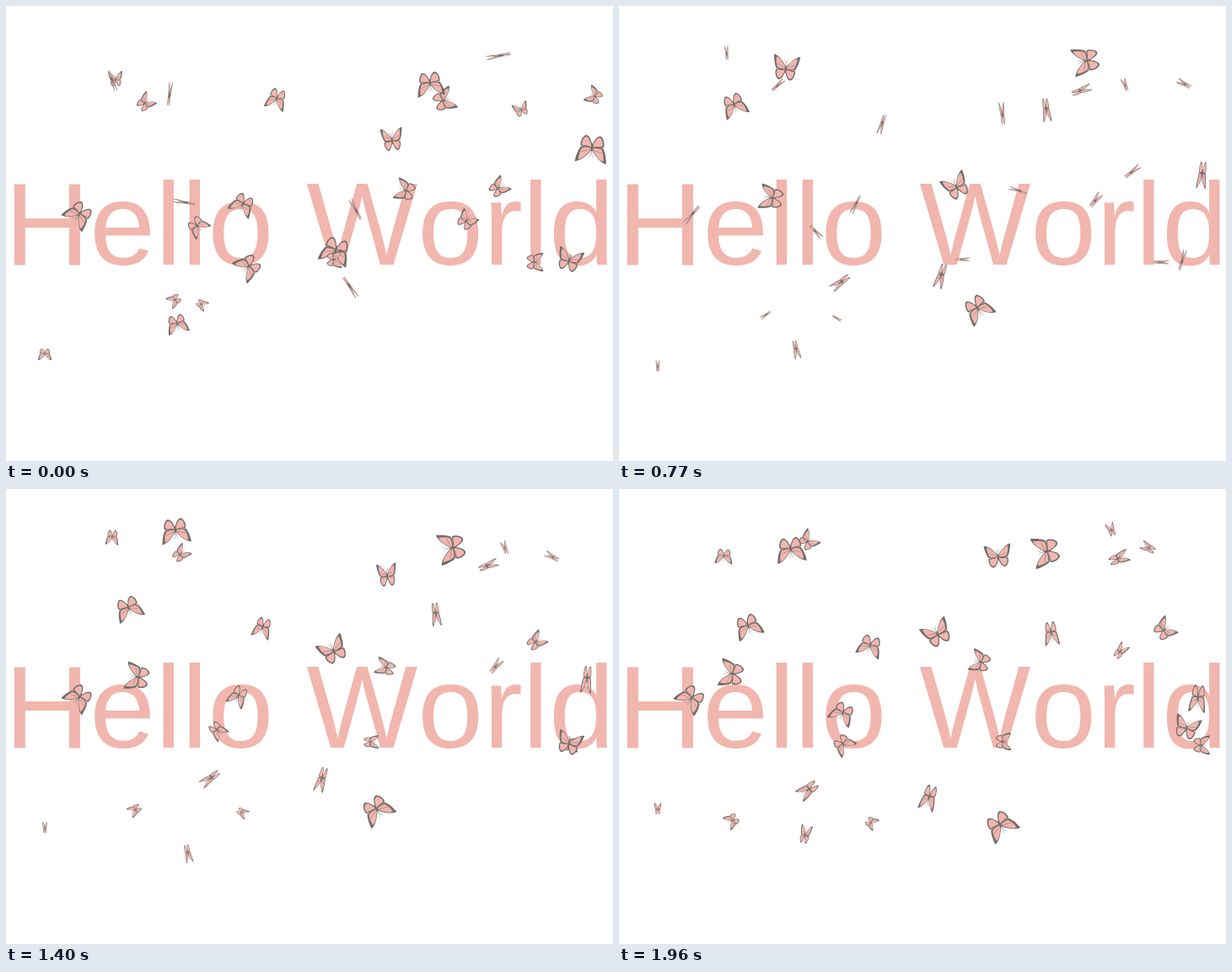
These frames come from a looping animation (720x540 px, 2.03 s). An HTML page with a canvas:

```html
<!DOCTYPE html>
<html lang="en">
<head>
<meta charset="utf-8">
<title>Hello World</title>
<style>
  html, body { margin: 0; width: 100%; height: 100%; overflow: hidden; background: #fff; }
  canvas { display: block; width: 720px; height: 540px; }
</style>
</head>
<body>
<canvas id="stage" width="720" height="540"></canvas>
<script>
const ctx = document.getElementById('stage').getContext('2d');
const STEP = 70, STEPS = 29;   // ms per pose, poses per loop
const SPEED = 2.83;            // px per pose
const TOP = 36, BOTTOM = 442;  // flight limits
const PINK = '#f1b6ad', GREY = '#706b6a';

// Left wings of a butterfly with a span of 1, head up.
const foreEdge = new Path2D('M0 -.04C-.12 -.22 -.34 -.42 -.5 -.43C-.48 -.27 -.44 -.1 -.36 .02C-.24 .06 -.1 .05 0 .02Z');
const foreFill = new Path2D('M-.03 -.04C-.13 -.2 -.28 -.34 -.4 -.36C-.4 -.22 -.37 -.1 -.31 -.01C-.2 .02 -.1 .02 -.03 0Z');
const hindEdge = new Path2D('M0 .01C-.14 .06 -.28 .04 -.36 .05C-.4 .16 -.34 .32 -.24 .38C-.13 .4 -.05 .25 0 .1Z');
const hindFill = new Path2D('M-.03 .04C-.14 .08 -.25 .07 -.32 .08C-.35 .17 -.3 .29 -.23 .33C-.14 .35 -.07 .21 -.03 .09Z');
const vein = new Path2D('M0 -.02L-.34 -.13');
const feelers = new Path2D('M0 -.08Q-.01 -.2 -.06 -.28M0 -.08Q.01 -.2 .06 -.28');

// Starts are x, y, heading in degrees; spans grow evenly along each flock.
const flocks = [
  { beat: 6.75, peak: 8, small: 16, large: 33, starts: [
    [232, 354, 32], [200, 349, 146], [130, 87, -94], [165, 115, -42],
    [584, 216, -38], [321, 110, 107], [458, 159, -96]] },
  { beat: 7.45, peak: 8, small: 17, large: 40, starts: [
    [46, 413, 90], [611, 123, -110], [698, 107, -152], [546, 255, -52], [203, 377, 77],
    [519, 112, -22], [288, 309, 143], [503, 92, 83], [391, 290, 107], [695, 169, 96]] },
  { beat: 7.95, peak: 4.1, small: 33, large: 38, starts: [
    [126, 88, 70], [212, 233, -170], [415, 242, -118],
    [194, 105, -83], [408, 333, 56], [585, 59, 169]] },
  // These rest on the lettering and leave one after another.
  { beat: 6.75, peak: 8, small: 22, large: 34, resting: true, starts: [
    [389, 301, -1], [627, 304, 0], [227, 261, 47], [474, 219, -163],
    [281, 235, 117], [668, 302, -74], [87, 247, 130]] }
];

function wing(side, open) {
  ctx.save();
  ctx.scale(side * open, 1);
  ctx.fillStyle = GREY;
  ctx.fill(hindEdge);
  ctx.fill(foreEdge);
  ctx.fillStyle = PINK;
  ctx.fill(hindFill);
  ctx.fill(foreFill);
  ctx.lineWidth = 0.012;
  ctx.stroke(vein);
  ctx.restore();
}

function butterfly(x, y, angle, span, open) {
  ctx.save();
  ctx.translate(x, y);
  ctx.rotate(angle);
  ctx.scale(span, span);
  ctx.strokeStyle = GREY;
  wing(-1, open);
  wing(1, open);
  ctx.lineWidth = 0.01;
  ctx.stroke(feelers);
  ctx.fillStyle = GREY;
  ctx.beginPath();
  ctx.ellipse(0, 0.03, 0.024, 0.12, 0, 0, 2 * Math.PI);
  ctx.fill();
  ctx.restore();
}

const flap = (n, beat, peak) =>
  0.1 + 0.87 * Math.abs(Math.cos(Math.PI * (n - peak) / beat)) ** 1.3;

function drawFlock({ beat, peak, small, large, resting, starts }, n) {
  starts.forEach(([x, y, degrees], i) => {
    const span = small + (large - small) * i / (starts.length - 1);
    const launch = resting ? 4.5 + i ** 1.75 : 0;
    const open = n < launch ? flap(n, 20, 21.5) : flap(n, beat, peak);
    const way = SPEED * Math.max(0, n - launch);
    const heading = degrees * Math.PI / 180;
    const dx = Math.cos(heading);
    let dy = Math.sin(heading);
    // Turn back at the upper and lower limits.
    const margin = 0.36 * span, straight = y + way * dy;
    const limit = Math.min(BOTTOM - margin, Math.max(TOP + margin, straight));
    if (limit !== straight) dy = -dy;
    butterfly(x + way * dx, 2 * limit - straight, Math.atan2(dx, -dy), span, open);
  });
}

function draw(n) {
  ctx.fillStyle = '#fff';
  ctx.fillRect(0, 0, 720, 540);
  ctx.font = '140px "Liberation Sans", Arial, sans-serif';
  ctx.fontKerning = 'none';
  ctx.textAlign = 'center';
  ctx.fillStyle = PINK;
  ctx.fillText('Hello World', 360, 307);
  for (const flock of flocks) drawFlock(flock, n);
}

const start = performance.now();
function frame() {
  draw(Math.floor((performance.now() - start) / STEP) % STEPS);
  requestAnimationFrame(frame);
}
frame();
</script>
</body>
</html>
```
